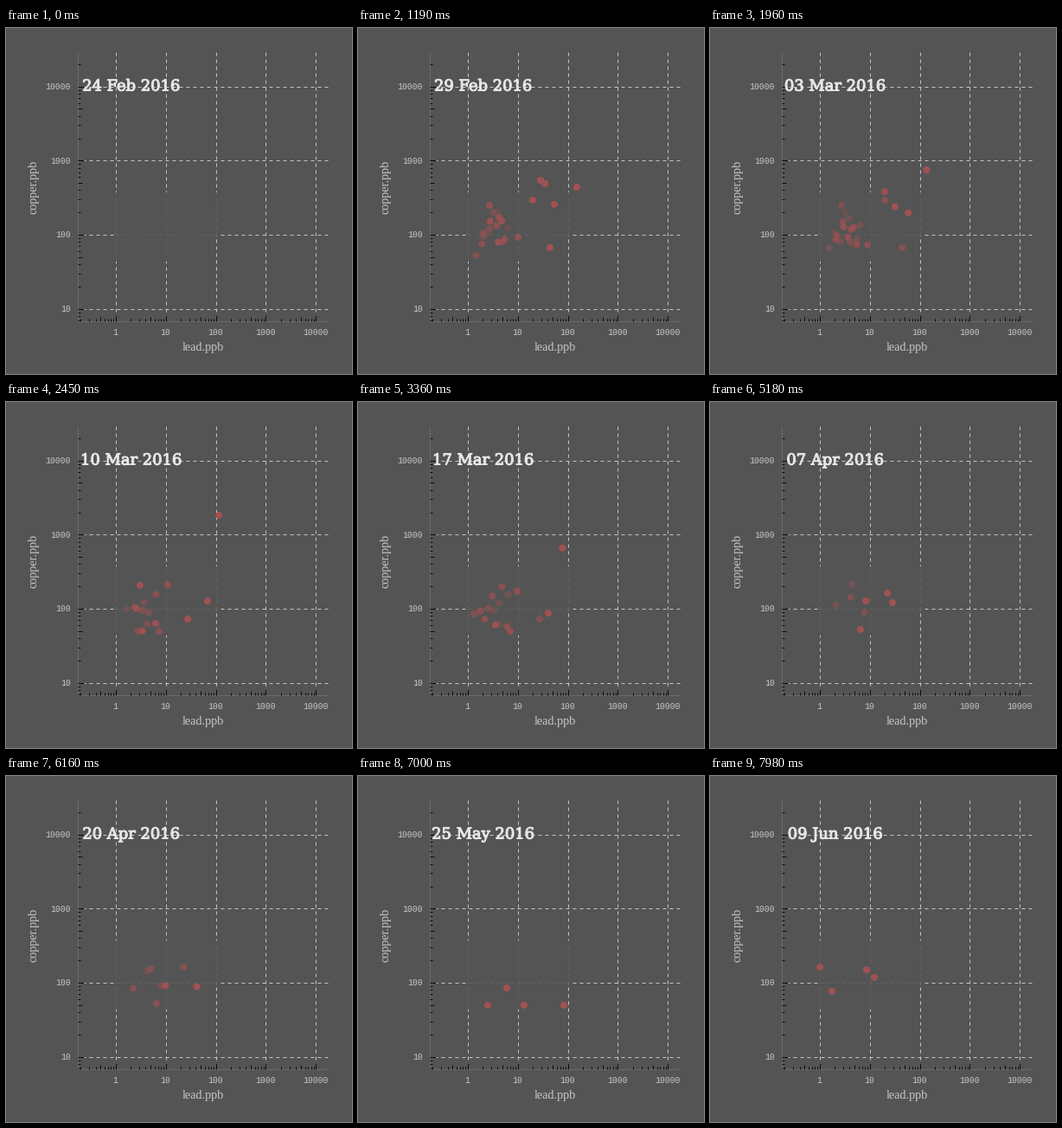
Write a matplotlib script that moves like this. It is 400 px wide and 400 px high and loops after 8000 ms.

```python
import numpy as np
import matplotlib.pyplot as plt
from matplotlib.animation import FuncAnimation
from matplotlib.collections import LineCollection
from matplotlib.patches import Rectangle
from matplotlib.patheffects import withStroke

SIZE, DPI = 400, 100
PX = 72 / DPI                      # one pixel in points
LOOP, TICK, STEP = 8000, 20, 70    # milliseconds
MOVES, PERIOD = 14, 20             # steps in a move, and in move plus rest
BG, GRID, LABEL, INK = "#545454", "#c4c4c4", "#c6c6c6", "#e6e6e6"
RED = (0.635, 0.318, 0.322)
MONTHS = "Jan Feb Mar Apr May Jun".split()
START = np.datetime64("2016-02-24")
DAYS = [0, 6, 20, 34, 50, 91, 121]   # day of each sampling round

# Decade spacing; lead 1 ppb and copper 10 ppb set the grid's corner
X0, DX = 126.6, 57.95
Y0, DY = 324.6, 85.65
LEFT, RIGHT, TOP, BOTTOM = 83, 371.5, 28, 338.5
FLOOR_X, FLOOR_Y = X0, 265           # detection limits

rng = np.random.default_rng(7)


def cloud(extra, *points):
    """Outlying points plus a random low-level group, as x, y, strength."""
    x = np.maximum(rng.normal(161, 18, extra), FLOOR_X)
    y = np.clip(rng.normal(245, 17, extra), 205, FLOOR_Y)
    low = np.column_stack([x, y, rng.uniform(.3, 1, extra)])
    far = [(px, py, 1) for px, py in points]
    both = np.vstack([low, np.reshape(far, (-1, 3))])
    return both[np.argsort(both[:, 0])]


# Step at which each cloud is complete
CLOUDS = {
    0: cloud(0),
    11: cloud(18, (211, 176), (216, 180), (253, 184), (202, 199), (227, 204),
              (222, 254)),
    23: cloud(13, (246, 131), (155, 212), (233, 230), (210, 251)),
    39: cloud(8, (169, 170), (222, 224), (201, 265), (174, 265)),
    50: cloud(4, (205, 221), (211, 232), (180, 230), (174, 263)),
    70: cloud(0, (150, 265), (172, 245), (192, 265), (238, 265)),
    77: cloud(0, (127, 221), (141, 249), (181, 224), (190, 233)),
}
KEYS = list(CLOUDS)


def progress(ms):
    """Steps moved so far: each round rests, then takes its moves."""
    cycle, s = divmod(int(ms // STEP), PERIOD)
    rest = 7 if cycle == 5 else 6
    return cycle * MOVES + min(max(s - rest, 0), MOVES)


def split(points, n):
    """Split points into n evenly picked ones and the others."""
    pick = np.linspace(0, len(points) - 1, n).round().astype(int)
    return points[pick], np.delete(points, pick, axis=0)


def cloud_at(u):
    k = min(np.searchsorted(KEYS, u, "right"), len(KEYS) - 1)
    start, end = KEYS[k - 1], KEYS[k]
    w = (u - start) / (end - start)
    w = w * w * (3 - 2 * w)
    a, b = CLOUDS[start], CLOUDS[end]
    n = min(len(a), len(b))
    (a, gone), (b, new) = split(a, n), split(b, n)
    return np.vstack([a + (b - a) * w, gone * [1, 1, 1 - w], new * [1, 1, w]])


def date_text(u):
    day = START + int(round(np.interp(u, np.arange(7) * MOVES, DAYS)))
    year, month, dd = str(day).split("-")
    return f"{dd} {MONTHS[int(month) - 1]} {year}"


fig = plt.figure(figsize=(SIZE / DPI, SIZE / DPI), dpi=DPI, facecolor=BG)
ax = fig.add_axes([0, 0, 1, 1])
ax.set(xlim=(0, SIZE), ylim=(SIZE, 0))
ax.axis("off")


def lines(segs, color, z, **kw):
    ax.add_collection(LineCollection(segs, colors=color, linewidths=PX,
                                     zorder=z, **kw))


def label(x, y, s, font, px, color=LABEL, ha="center", **kw):
    return ax.text(x, y, s, family=font, fontsize=px * PX, color=color,
                   ha=ha, **kw)


# Grid and its labels
grid = []
for i in range(5):
    x = X0 + DX * i
    grid.append([(x, TOP), (x, BOTTOM)])
    label(x, 355, str(10 ** i), "Liberation Mono", 9.8)
for i in range(4):
    y = Y0 - DY * i
    grid.append([(RIGHT, y), (LEFT, y)])
    label(75, y + 3.5, str(10 ** (i + 1)), "Liberation Mono", 9.8, ha="right")
lines(grid, GRID, 1, linestyles=[(0, (4, 4))])

# The grid is worn away where most points lie
for corner, w, h in [((125, 190), 111, 80), ((236, 190), 9, 50)]:
    ax.add_patch(Rectangle(corner, w, h, fc=BG, ec="none", alpha=.88,
                           zorder=2))

# Axes and logarithmic ticks
lines([[(LEFT, TOP), (LEFT, BOTTOM)], [(LEFT, BOTTOM), (RIGHT, BOTTOM)]],
      "#6b6b6b", 2)
ticks = []
for decade in range(-1, 5):
    for m in range(1, 10):
        size = {1: 7, 5: 5}.get(m, 3)
        pos = decade + np.log10(m)
        x, y = X0 + DX * pos, Y0 - DY * (pos - 1)
        if LEFT < x < RIGHT:
            ticks.append([(x, BOTTOM), (x, BOTTOM - size)])
        if TOP < y < BOTTOM:
            ticks.append([(LEFT, y), (LEFT + size, y)])
lines(ticks, "#0c0c0c", 3)

label(228.3, 373.5, "lead.ppb", "Liberation Serif", 14.3)
label(32, 184, "copper.ppb", "Liberation Serif", 14.3, rotation=90,
      va="center")

dots = ax.scatter([], [], s=(8 * PX) ** 2, linewidths=0, zorder=4)
date = label(144.5, 72.5, "", "DejaVu Serif", 17.9, color=INK, zorder=6)
date.set_path_effects([withStroke(linewidth=.75, foreground=INK)])


def update(i):
    u = progress((i + .5) * TICK)
    points = cloud_at(u)
    dots.set_offsets(points[:, :2])
    dots.set_facecolors([(*RED, a) for a in points[:, 2]])
    date.set_text(date_text(u))
    return dots, date


anim = FuncAnimation(fig, update, frames=LOOP // TICK, interval=TICK,
                     init_func=lambda: update(0), repeat=True, repeat_delay=0)
plt.show()
```
